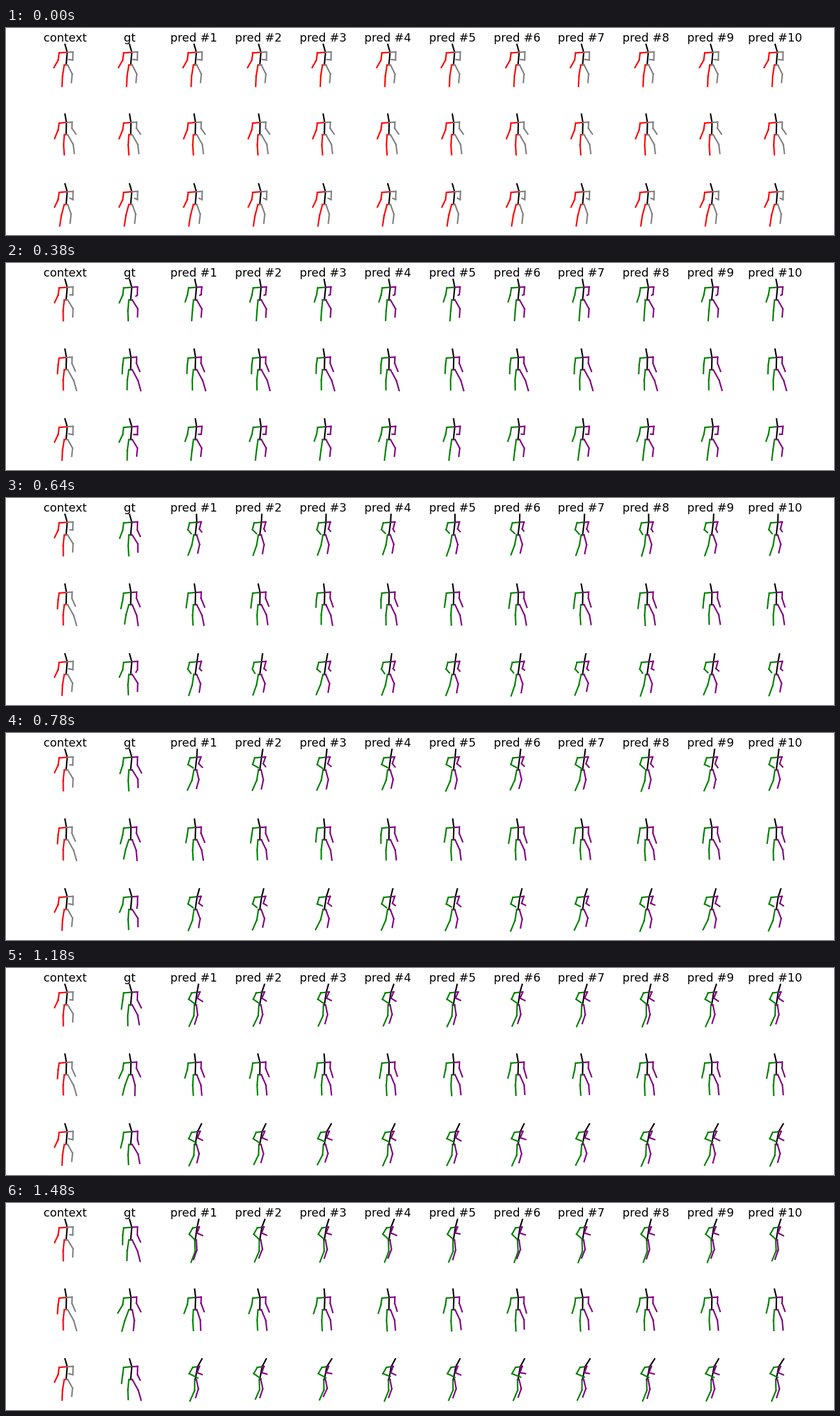
These frames come from a looping animation (1280x320 px, 1.5 s). A matplotlib script:

```python
import numpy as np
import matplotlib.pyplot as plt
from matplotlib.animation import FuncAnimation
from matplotlib.collections import LineCollection

W, H, DPI = 1280, 320, 100
FRAMES, SPLIT = 75, 15
PREDICTIONS = 10
COLUMNS = PREDICTIONS + 2
CENTRES = W / 2 + 99.8 * (np.arange(COLUMNS) - (COLUMNS - 1) / 2)
KEYS = np.array([0, SPLIT - 1, 34, FRAMES - 1])
TIME = np.arange(FRAMES)

SPINE = ["pelvis", "thorax", "head"]
LIMBS = {"left": [["thorax", "shoulder", "elbow", "wrist"], ["pelvis", "hip", "knee", "ankle"]],
         "right": [["thorax", "shoulder", "elbow", "wrist"], ["pelvis", "hip", "knee", "ankle"]]}
SEEN = {"mid": "black", "left": "red", "right": "gray"}
AHEAD = {"mid": "black", "left": "green", "right": "purple"}

rng = np.random.default_rng(4)


def smooth(poses):
    """Cubic Hermite path through the key poses, sampled at every frame."""
    p = np.array(poses, float)
    slope = np.gradient(p, KEYS, axis=0)
    i = np.clip(np.searchsorted(KEYS, TIME, side="right") - 1, 0, len(KEYS) - 2)
    step = (KEYS[i + 1] - KEYS[i])[:, None, None]
    u = (TIME - KEYS[i])[:, None, None] / step
    return (p[i] * (1 + 2 * u) * (1 - u) ** 2 + slope[i] * step * u * (1 - u) ** 2
            + p[i + 1] * u * u * (3 - 2 * u) + slope[i + 1] * step * u * u * (u - 1))


def point(x, y):
    return np.stack(np.broadcast_arrays(x, y, np.zeros(FRAMES))[:2], axis=1)


def skeleton(poses, chest, arm, lean=0.0, turn=0):
    """Hands and feet follow the key poses; the other joints follow from them."""
    left_hand, right_hand, left_foot, right_foot = smooth(poses).transpose(1, 0, 2)
    u = np.clip((TIME - SPLIT + 1) / (FRAMES - SPLIT), 0, 1)
    ease = 1 - (1 - u) ** 2
    u, bow = u * turn, ease * turn
    x, y = chest
    left_hip, right_hip = -1 + 2 * u, 4.3 - .8 * u

    def knee(hip, foot, bend):
        return point((hip + foot[:, 0]) / 2 + bend, foot[:, 1] / 2 + .5)

    mid = {"pelvis": point(1.8, 0),
           "thorax": point(x + .15 * lean * ease, y),
           "head": point(.1 + lean * ease, -31.8)}
    left = {"shoulder": point(-9 + 7 * u, y + 1),
            "elbow": point(-10.5 + 3 * u, -7.5 - 1.5 * bow),
            "wrist": left_hand,
            "hip": point(left_hip, 0),
            "knee": knee(left_hip, left_foot, 4.5 * bow - 1),
            "ankle": left_foot}
    right = {"shoulder": point(arm[0] - 4.2 * u, y - .5),
             "elbow": point(arm[0] - .3 - 7.5 * bow, arm[1] - 3 * bow),
             "wrist": right_hand,
             "hip": point(right_hip, 0),
             "knee": knee(right_hip, right_foot, 2 + .35 * (33 - right_foot[:, 1])),
             "ankle": right_foot}
    return {"mid": mid, "left": {**mid, **left}, "right": {**mid, **right}}


def bones(body):
    """Segments of one figure, shape (frames, bones, 2, 2)."""
    chains = [(body["mid"], SPINE)]
    chains += [(body[side], limb) for side in LIMBS for limb in LIMBS[side]]
    pairs = [(joints[a], joints[b]) for joints, chain in chains
             for a, b in zip(chain, chain[1:])]
    return np.stack([np.stack(pair, axis=1) for pair in pairs], axis=1)


def row(base, chest, arm, past, true, pred, lean=0.0):
    """Context, ground truth and varied predictions, side by side."""
    real = bones(skeleton(past + true, chest, arm))
    people = [real[np.minimum(TIME, SPLIT - 1)], real]
    for _ in range(PREDICTIONS):
        varied = past + [np.array(p) + rng.normal(0, .7, (4, 2)) for p in pred]
        tilt = lean + rng.normal(0, .8)
        people.append(bones(skeleton(varied, chest, arm, tilt, int(lean > 0))))
    return [p + (x, base) for p, x in zip(people, CENTRES)]


# Key poses: left hand, right hand, left foot, right foot, relative to the pelvis.
top = row(
    57.2, chest=(3.6, -19.7), arm=(12.4, -7.8), lean=8.8,
    past=[[(-17, 4), (5.5, -8.5), (-4.5, 33), (10, 27)],
          [(-16, 4), (8, -8), (-2.5, 32), (12, 26)]],
    true=[[(-15, 5), (17.3, 3), (-1, 32), (13, 26.5)],
          [(-10.7, 7), (17, 3), (-4, 31.5), (16.5, 33)]],
    pred=[[(-3, -2.5), (11, -5), (-8.5, 31), (5.5, 28)],
          [(2, -1), (13, -8), (-4.8, 34), (.3, 28.5)]])
middle = row(
    165, chest=(2.3, -19), arm=(11.1, -10),
    past=[[(-16, 6), (17, -1), (-1, 31), (14.5, 29)],
          [(-11.5, 6), (16, 2), (-2.5, 31), (18, 32)]],
    true=[[(-13.5, 6), (16.3, 3), (-8, 29.5), (12.8, 32)],
          [(-18, 5), (17.5, 3), (-11.7, 33), (6, 32)]],
    pred=[[(-12, 5), (15.5, 3), (-2, 31), (14, 31)],
          [(-14.5, 5), (15.5, 3), (-1.5, 32), (12.3, 30.5)]])
bottom = row(
    272.8, chest=(3.6, -19.7), arm=(12.6, -7.5), lean=12.5,
    past=[[(-16, 4), (8, -9.5), (-8, 33), (8, 29)],
          [(-16, 4), (6, -8.7), (-4.5, 32), (10.5, 26)]],
    true=[[(-15.5, 4), (10.5, -3), (-1.6, 31), (12.5, 26)],
          [(-12.2, 6), (16.5, 1), (-2, 31), (18, 32)]],
    pred=[[(-3.5, -3), (12, -6), (-9.5, 32), (7.5, 27.5)],
          [(4.5, -3), (13, -8), (-5.5, 32.5), (2, 28)]])

figures = top + middle + bottom
segments = np.concatenate(figures, axis=1)
SIDES = ["mid"] * 2 + ["left"] * 6 + ["right"] * 6


def palette(after):
    return [(AHEAD if after and n % COLUMNS else SEEN)[side]
            for n in range(len(figures)) for side in SIDES]


COLOURS = palette(False), palette(True)

fig = plt.figure(figsize=(W / DPI, H / DPI), dpi=DPI, facecolor="white")
ax = fig.add_axes([0, 0, 1, 1])
ax.set_xlim(0, W)
ax.set_ylim(H, 0)
ax.axis("off")

titles = ["context", "gt"] + [f"pred #{n + 1}" for n in range(PREDICTIONS)]
for x, title in zip(CENTRES, titles):
    ax.text(x, 21, title, ha="center", va="baseline",
            fontsize=12.8, family="DejaVu Sans", color="black")

lines = LineCollection(segments[0], linewidths=1.6, colors=COLOURS[0], capstyle="projecting")
ax.add_collection(lines, autolim=False)


def draw(frame):
    lines.set_segments(segments[frame])
    lines.set_color(COLOURS[frame >= SPLIT])
    return [lines]


anim = FuncAnimation(fig, draw, frames=FRAMES, interval=20, repeat=True, repeat_delay=0)
plt.show()
```
